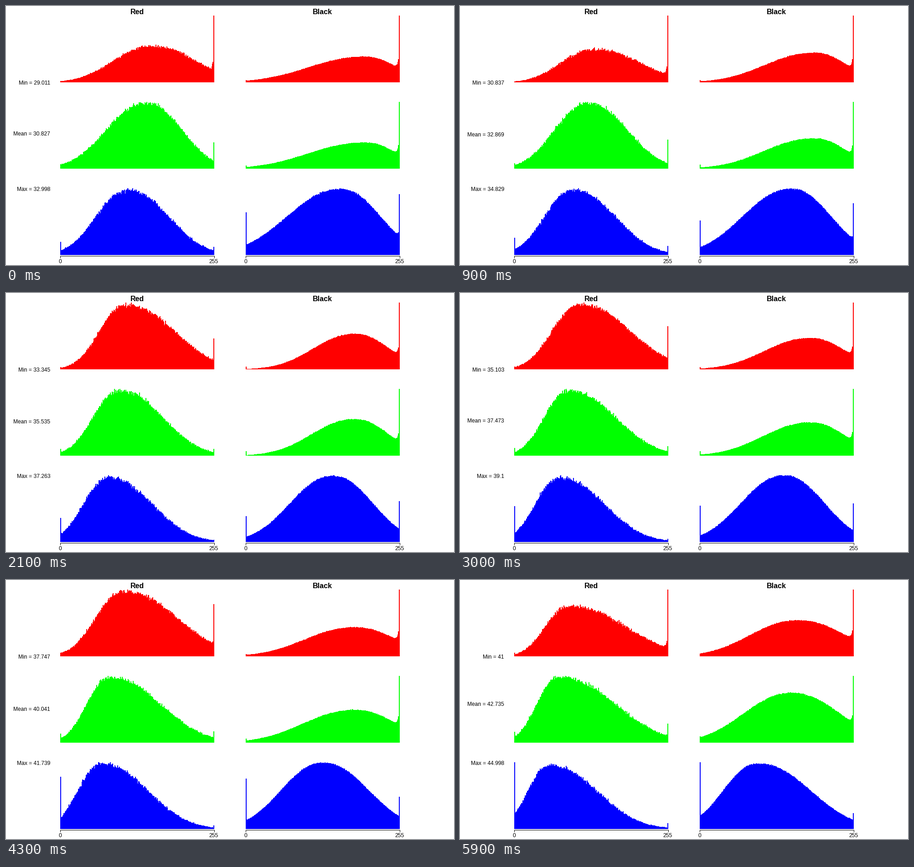
Recreate the animation shown at these times as a matplotlib script. Size 983 px wide and 570 px high, loop 6000 ms.

```python
import numpy as np
import matplotlib.pyplot as plt
from matplotlib.animation import FuncAnimation

W, H, DPI = 983, 570, 64
PX = 72 / DPI          # one pixel in points
FRAMES, STEP = 60, 100
FULL = 147             # height of the tallest bar
SPAN = 336             # distance from the first bar to the last
LEVELS = np.arange(256)

plt.rcParams["font.family"] = "Liberation Sans"

# Readings at a few moments of the loop
MOMENTS = [0, 9, 21, 30, 43, 52, 59]
READINGS = {
    "Min": [29.011, 30.837, 33.345, 35.103, 37.747, 39.576, 41],
    "Mean": [30.827, 32.869, 35.535, 37.473, 40.041, 41.355, 42.735],
    "Max": [32.998, 34.829, 37.263, 39.1, 41.739, 43.574, 44.998],
}
MEAN_Y = [281, 283, 283, 281, 284, 280, 273]

COLORS = ["#ff0000", "#00ff00", "#0000ff"]
BASES = [168, 358, 548]
GLARE = np.array([1.84, 2.04, 0.45, 0.66, 0.73, 0.93, 1.33])

# Every list is a track of values spread evenly over the loop.
# peak, rise, fall: place of the crest and spread on either side, 0 to 1
# first, last: end bars relative to the crest
COLUMNS = [
    dict(title="Red", left=119, grain=0.22, panels=[
        dict(peak=[0.60, 0.43, 0.43, 0.36], rise=[0.25, 0.17, 0.19, 0.155],
             fall=[0.28, 0.36], first=[0.02, 0.07], last=GLARE),
        dict(peak=[0.56, 0.39, 0.33, 0.29], rise=[0.255, 0.172, 0.15, 0.14],
             fall=[0.23, 0.36], first=[0.07, 0.17], last=0.22 * GLARE),
        dict(peak=[0.44, 0.32, 0.28, 0.23], rise=[0.205, 0.165, 0.155, 0.14],
             fall=[0.262, 0.305], first=[0.2, 0.35, 0.75, 1.05], last=0.07 * GLARE),
    ]),
    dict(title="Black", left=526, grain=0.06, panels=[
        dict(peak=[0.78, 0.71, 0.73, 0.64], rise=[0.36, 0.26, 0.32, 0.305],
             fall=[0.2, 0.225, 0.305], first=[0.08], last=[2.6, 1.85, 2.4, 1.85]),
        dict(peak=[0.78, 0.71, 0.74, 0.60], rise=[0.36, 0.27, 0.335, 0.305],
             fall=[0.2, 0.22, 0.305], first=[0.13], last=[2.55, 1.8, 2.2, 1.34]),
        dict(peak=[0.62, 0.57, 0.53, 0.38], rise=[0.34, 0.27, 0.275, 0.222],
             fall=[0.25, 0.255, 0.333], first=[0.65, 0.37, 0.7, 1.02],
             last=[0.92, 0.62, 0.54, 0.24]),
    ]),
]


def track(n, points):
    return np.interp(n, np.linspace(0, FRAMES - 1, len(points)), points)


def reading(n, values):
    return np.interp(n, MOMENTS, values)


def histogram(n, grain, rng, peak, rise, fall, first, last):
    """Lopsided bell with grain, clipped levels piling up at both ends."""
    peak, rise, fall, first, last = (
        track(n, points) for points in (peak, rise, fall, first, last))
    away = LEVELS / 255 - peak
    spread = np.where(away < 0, rise, fall)
    bars = np.exp(-0.5 * np.abs(away / spread) ** 2.2)
    bars += 0.18 * max(last - 0.6, 0) * np.exp(-(254 - LEVELS) / 2.2)
    bars[0] = max(bars[0], first)
    bars[-1] = last
    bars *= FULL / bars.max()
    inner = bars[1:-1]
    inner += rng.normal(0, grain, inner.size) * np.sqrt(inner)
    return np.clip(bars * FULL / bars.max(), 1, FULL)


def outline(bars):
    """Every bar is two pixels wide, so neighbours overlap."""
    heights = np.zeros(SPAN + 2)
    x = LEVELS * SPAN // 255
    for shift in (0, 1):
        np.maximum.at(heights, x + shift, np.round(bars))
    return heights


fig = plt.figure(figsize=(W / DPI, H / DPI), dpi=DPI, facecolor="white")
ax = fig.add_axes([0, 0, 1, 1])
ax.set_xlim(0, W)
ax.set_ylim(H, 0)
ax.axis("off")


def label(x, y, text="", size=12, ha="center", **style):
    return ax.text(x, y, text, fontsize=size * PX, ha=ha, va="baseline",
                   color="black", **style)


shapes = []
for column in COLUMNS:
    left = column["left"]
    label(left + SPAN / 2 + 0.5, 18, column["title"], 16, weight="bold")
    a, b = left - 0.5, left + SPAN + 1.5
    ax.plot([a, a, b, b], [553.5, 549.5, 549.5, 553.5], color="black", lw=PX)
    label(a, 566, "0")
    label(b - 0.5, 566, "255")

    edges = left + np.arange(SPAN + 3)
    for panel, base, color in zip(column["panels"], BASES, COLORS):
        shape = ax.stairs(np.full(SPAN + 2, base), edges, baseline=base, fill=True,
                          color=color, lw=0, antialiased=False)
        shapes.append((shape, panel, base, column["grain"]))

texts = {name: label(97, y, ha="right")
         for name, y in (("Min", 173), ("Mean", 285), ("Max", 407))}


def draw(n):
    rng = np.random.default_rng(n + 7)
    for shape, panel, base, grain in shapes:
        bars = histogram(n, grain, rng, **panel)
        shape.set_data(values=base - outline(bars))
    for name, text in texts.items():
        text.set_text(f"{name} = {round(reading(n, READINGS[name]), 3):g}")
    texts["Mean"].set_y(round(reading(n, MEAN_Y)) + 4)
    return [shape for shape, *_ in shapes] + list(texts.values())


anim = FuncAnimation(fig, draw, frames=FRAMES, interval=STEP, repeat=True,
                     repeat_delay=0, blit=False)
plt.show()
```
